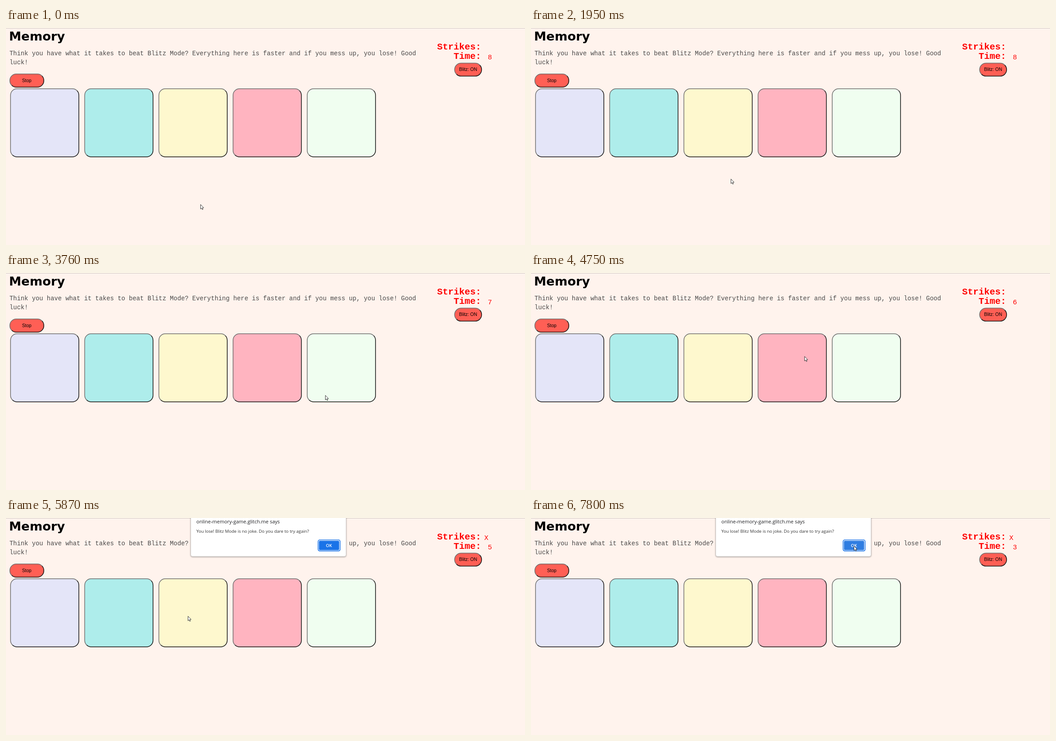
Write an HTML page that moves like this. It is 1156 px wide and 485 px high and loops after 8000 ms.

```html
<!DOCTYPE html>
<html lang="en">
<head>
<meta charset="utf-8">
<title>Memory</title>
<style>
  html, body { margin: 0; width: 100%; height: 100%; overflow: hidden; background: #fff3ed; }
  svg { display: block; width: 1156px; height: 485px; }
  text { white-space: pre; }
  .heading { font: bold 27.4px "DejaVu Sans", sans-serif; }
  .intro { font: 13.85px "Liberation Mono", monospace; fill: #484848; }
  .label { font: bold 20.4px "Liberation Mono", monospace; fill: #f00; }
  .value { font: 15.3px "Liberation Mono", monospace; fill: #f00; }
  .button { font: 10.2px "Liberation Sans", sans-serif; text-anchor: middle; }
  .title { font: 11.03px "Open Sans", sans-serif; fill: #202124; }
  .message { font: 9.6px "Open Sans", sans-serif; fill: #333; }
  .ok { font: 600 9.5px "Open Sans", sans-serif; fill: #fff; text-anchor: middle; }
  #dialog > path { filter: drop-shadow(0 1px 1.5px rgba(0, 0, 0, .35)); }
</style>
</head>
<body>
<svg viewBox="0 0 1156 485">
  <rect width="1156" height="485" fill="#fff3ed"/>
  <rect width="1156" height="1" fill="#cfc7c3"/>
  <text class="heading" x="6.8" y="28">Memory</text>
  <text class="intro" x="7.8" y="61">Think you have what it takes to beat Blitz Mode? Everything here is faster and if you mess up, you lose! Good</text>
  <text class="intro" x="7.8" y="81">luck!</text>
  <text class="label" x="960.3" y="48">Strikes:</text>
  <text class="label" x="997" y="69.3">Time:</text>
  <text class="value" id="strike" x="1065.3" y="49">X</text>
  <text class="value" id="time" x="1073.3" y="70">8</text>
  <g id="boxes"></g>
  <text class="button" x="46.3" y="121">Stop</text>
  <text class="button" x="1029.3" y="96">Blitz: ON</text>
  <g id="dialog">
    <path d="M411.5 -40H757.5V82a4 4 0 0 1 -4 4H415.5a4 4 0 0 1 -4 -4Z" fill="#fff" stroke="#c4bfbc" stroke-width=".8"/>
    <text class="title" x="424" y="12">online-memory-game.glitch.me says</text>
    <text class="message" x="424" y="33.3">You lose! Blitz Mode is no joke. Do you dare to try again?</text>
    <rect x="695.2" y="49" width="49" height="24.6" rx="3.5" fill="#fff" stroke="#1a73e8" stroke-width="1.6"/>
    <rect id="okFace" x="697" y="51" width="45" height="20.8" rx="2"/>
    <text class="ok" x="719.3" y="64.8">OK</text>
  </g>
  <path id="cursor" d="M.4 .5V10.6L2.7 8.5L4.3 12L5.8 11.3L4.3 7.9H7.4Z" fill="#fff" stroke="#222" stroke-width=".9"/>
</svg>
<script>
const LOOP = 8000, FLASH = 220, SECOND = 1000;
const ROUND_TWO = 1750, DIALOG_START = 5070, DIALOG_SLIDE = 190, OK_PRESS = 7800;

const $ = id => document.getElementById(id);
const progress = (t, start, length) => Math.min(1, Math.max(0, (t - start) / length));

// Rounded box with an outset border: grey top and left, black bottom and right.
function outsetBox(x, y, w, h, fill) {
  const r = 14.5, d = r * (1 - Math.SQRT1_2), right = x + w, bottom = y + h;
  const arc = (px, py) => `A${r} ${r} 0 0 1 ${px} ${py}`;
  const group = document.createElementNS('http://www.w3.org/2000/svg', 'g');
  group.innerHTML = `
    <rect x="${x}" y="${y}" width="${w}" height="${h}" rx="${r}" fill="${fill}"/>
    <g fill="none" stroke-width="1.5">
      <path stroke="#6e6e6e" d="M${x + d} ${bottom - d}${arc(x, bottom - r)}V${y + r}${arc(x + r, y)}H${right - r}${arc(right - d, y + d)}"/>
      <path stroke="#111" d="M${right - d} ${y + d}${arc(right, y + r)}V${bottom - r}${arc(right - r, bottom)}H${x + r}${arc(x + d, bottom - d)}"/>
    </g>`;
  $('boxes').append(group);
  return group;
}

outsetBox(8.5, 102.8, 75.8, 29.4, '#ff5f55');
outsetBox(999.2, 78.6, 60.2, 29, '#ff5f55');

const cards = [
  { rest: '#e4e5f8' },
  { rest: '#aeedeb' },
  { rest: '#fef8ce', lit: '#f7e77c', flashes: [3190] },
  { rest: '#ffb4c0', lit: '#ff85a0', flashes: [4870] },
  { rest: '#f0fef0', lit: '#a9f5a9', flashes: [430, 1420, 2640, 4200] }
];
cards.forEach((card, i) => card.group = outsetBox(10.1 + 165.2 * i, 135.8, 152.2, 152.2, card.rest));

function drawCard({ group, rest, lit, flashes = [] }, t) {
  const on = flashes.some(start => t >= start && t < start + FLASH);
  group.firstElementChild.setAttribute('fill', on ? lit : rest);
  group.setAttribute('transform', `translate(0 ${on ? 4 : 0})`);
}

// Pointer strokes slow down towards their end; bow bends one sideways.
const strokes = [];
let rest = [433, 394];
function stroke(start, end, to, bow = 0) {
  strokes.push({ start, length: end - start, from: rest, to, bow });
  rest = to;
}
stroke(0, 1, rest);
stroke(650, 1120, [741, 238]);
stroke(1660, 1950, [445, 337]);
stroke(2850, 3610, [711, 273]);
stroke(4410, 4750, [609, 186]);
stroke(4840, 5160, [602, 206]);
stroke(5220, 5350, [575, 324]);
stroke(5630, 6360, [461, 24], .38);
stroke(6510, 6620, [756, 20]);
stroke(6640, 7290, [640, 68], .45);
stroke(7320, 7660, [719, 62]);

function pointerAt(t) {
  const { start, length, from: [x, y], to, bow } = strokes.findLast(s => t >= s.start);
  const p = Math.sin(progress(t, start, length) * Math.PI / 2);
  const side = bow * Math.sin(p * Math.PI), dx = to[0] - x, dy = to[1] - y;
  return [x + dx * p + dy * side, y + dy * p - dx * side].map(Math.round);
}

// The second round refills the clock and holds it while the clue plays.
function secondsLeft(t) {
  const countdownStart = t < ROUND_TWO ? ROUND_TWO - 2 * SECOND : ROUND_TWO + SECOND;
  return 8 - Math.max(0, Math.floor((t - countdownStart) / SECOND));
}

function draw(t) {
  cards.forEach(card => drawCard(card, t));
  $('time').textContent = secondsLeft(t);
  $('strike').style.display = t >= DIALOG_START ? '' : 'none';

  const p = progress(t, DIALOG_START, DIALOG_SLIDE);
  $('dialog').setAttribute('transform', `translate(0 ${-24 * (1 - p) ** 3})`);
  $('dialog').setAttribute('opacity', Math.min(1, p * 3));
  $('okFace').setAttribute('fill', t >= OK_PRESS ? '#2f7de1' : '#1a73e8');

  $('cursor').setAttribute('transform', `translate(${pointerAt(t)})`);
}

const epoch = performance.now();
function tick() {
  draw((performance.now() - epoch) % LOOP);
  requestAnimationFrame(tick);
}
tick();
</script>
</body>
</html>
```
